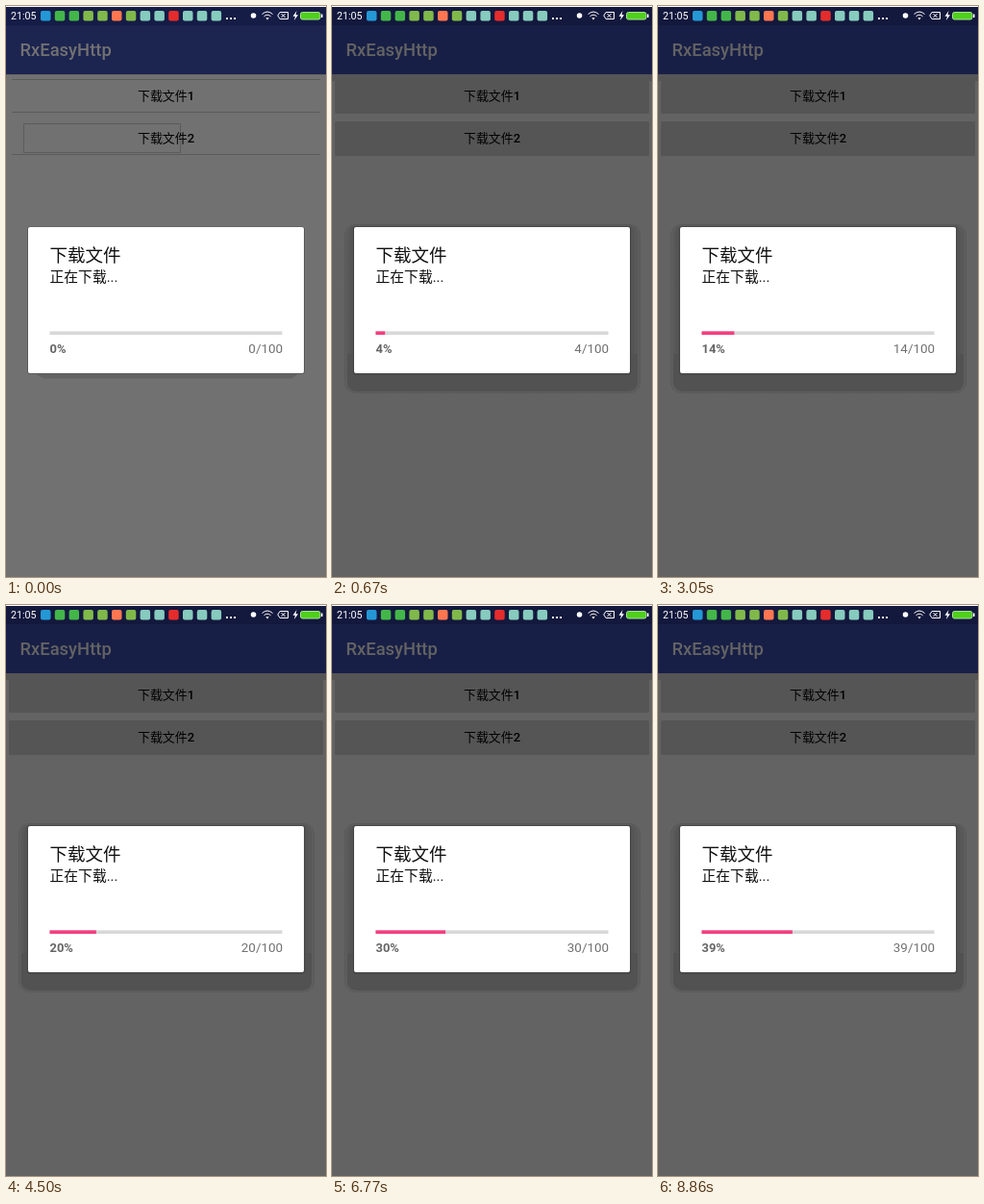
Recreate the animation shown at these times as an HTML page. Size 333 by 594 pixels, loop 8.96 s.

```html
<!DOCTYPE html>
<html lang="zh-CN">
<head>
<meta charset="utf-8">
<style>
html, body { margin: 0; width: 100%; height: 100%; overflow: hidden; background: #fff; }
svg { display: block; width: 333px; height: 594px; }
text { font-family: Roboto, "Noto Sans CJK SC", "Noto Sans CJK", sans-serif; }
.button { font-size: 12.95px; font-weight: 500; text-anchor: middle; }
</style>
</head>
<body>
<svg viewBox="0 0 333 594">
  <!-- Page, dimmed by the scrim -->
  <rect width="333" height="594" fill="#fff"/>
  <rect y="20" width="333" height="51" fill="#3f51b5"/>
  <rect width="333" height="20" fill="#303f9f"/>
  <text x="14.5" y="52.4" font-size="18.4" font-weight="500" fill="#fff">RxEasyHttp</text>
  <g id="buttons" fill="#dcdcdc">
    <rect x="3" y="76" width="327" height="36" rx="1.5"/>
    <rect x="3" y="120" width="327" height="36" rx="1.5"/>
    <rect y="71" width="333" height="7"/>
  </g>
  <rect id="scrim" width="333" height="594"/>
  <rect width="333" height="1" fill="#fff"/>

  <g id="opening" fill="none" stroke="#5b5b5b">
    <path d="M0 71.5H333" stroke="#666"/>
    <path d="M6 76.5H327M6 110.5H327M6 154.5H327"/>
    <path d="M18.5 122.5H181.5V152.5H18.5Z"/>
    <path d="M30 382H305L297 387.5H39Z" fill="#626262" stroke="none"/>
    <rect x="22.5" y="230" width="288" height="152.5" rx="2"/>
  </g>
  <g id="settled">
    <rect x="13.5" y="227.5" width="307" height="175" rx="11" fill="#5f5f5f" stroke="#525252" stroke-dasharray="1"/>
    <rect x="15.5" y="228" width="303" height="173" rx="10" fill="#595959"/>
    <rect x="18.5" y="229" width="296" height="164" rx="7" fill="#555"/>
    <path id="patch" d="M16 362H318V390Q318 401 307 401H27Q16 401 16 390Z" fill="#525252"/>
    <rect x="21.5" y="229" width="290" height="155" rx="3" fill="#4a4a4a"/>
  </g>
  <text class="button" x="166.5" y="97.6">下载文件1</text>
  <text class="button" x="166.5" y="141.8">下载文件2</text>

  <g id="status" fill="#fff">
    <text x="5" y="14" font-size="10.7">21:05</text>
    <path d="M229 12h2v2h-2zM233 12h2v2h-2zM237 12h2v2h-2z"/>
    <circle cx="257.5" cy="10" r="2.8"/>
    <g fill="none" stroke="#fff">
      <path d="M266.5 8.5Q272 3.5 277.5 8.5M268.5 10.8Q272 7.6 275.5 10.8"/>
      <path d="M285 6.5H293.5V13.5H285L282.8 10ZM286.5 8l4 4m0-4l-4 4"/>
    </g>
    <path d="M270.3 12.2h3.4L272 14.5ZM302.5 5L298.5 10.7H301L299.8 15L304 9.2H301.5Z"/>
    <rect x="306.5" y="6.5" width="20.5" height="7.5" rx="2" fill="#4fd01c" stroke="#a9dc9a"/>
    <path d="M328 8.5h1.5v3.5H328Z"/>
  </g>

  <rect x="23" y="230" width="287" height="152" rx="2" fill="#fff"/>
  <text x="45.5" y="265.8" font-size="18.5" fill="#111">下载文件</text>
  <text x="45.5" y="287.4" font-size="14.8" fill="#111">正在下载...</text>
  <rect x="45.5" y="338.4" width="242" height="3.7" fill="#d8d8d8"/>
  <rect id="fill" x="45.5" y="338.4" height="3.7" fill="#f43f7f"/>
  <text id="percent" x="45.5" y="361.4" font-size="12.95" font-weight="700" fill="#666"></text>
  <text id="count" x="288" y="361.4" font-size="13.4" text-anchor="end" fill="#707070"></text>
</svg>
<script>
const LOOP = 8960;
const $ = id => document.getElementById(id);

// Each run counts up by one at every listed time, from its first value.
const runs = [
  [0, [0, 120, 270, 390, 670]],
  [9, [1940, 2060, 2340, 2490, 2900, 3050, 3360, 3520, 3820, 3940, 4220, 4500]],
  [23, [5270, 5420, 5690, 5830, 5970, 6270, 6520, 6770, 7020, 7170,
        7450, 7600, 7880, 8030, 8310, 8580, 8860]]
];

function progressAt(time) {
  const [first, times] = runs.findLast(([, times]) => times[0] <= time);
  return first + times.filter(t => t <= time).length - 1;
}

// Notification badges in the status bar
const green = '#43b649', lime = '#80b94a', orange = '#ff7650', teal = '#86cbbd';
['#2498d5', green, green, lime, lime, orange, lime, teal, teal, '#e52c2c', teal, teal, teal]
  .forEach((color, i) => {
    const badge = document.createElementNS('http://www.w3.org/2000/svg', 'rect');
    const box = { x: 36 + i * 14.8, y: 5, width: 10.5, height: 10.5, rx: 2, fill: color };
    for (const key in box) badge.setAttribute(key, box[key]);
    $('status').append(badge);
  });

function show(id, visible) {
  $(id).setAttribute('visibility', visible ? 'inherit' : 'hidden');
}

function paint(time) {
  const opening = time < 120;
  const value = progressAt(time);
  show('opening', opening);
  show('settled', !opening);
  show('buttons', !opening);
  show('patch', time >= 270);
  $('scrim').setAttribute('opacity', opening ? 0.555 : 0.61);
  $('fill').setAttribute('width', value * 2.42);
  $('percent').textContent = value + '%';
  $('count').textContent = value + '/100';
}

const start = performance.now();
function frame() {
  paint((performance.now() - start) % LOOP);
  requestAnimationFrame(frame);
}
paint(0);
requestAnimationFrame(frame);
</script>
</body>
</html>
```
